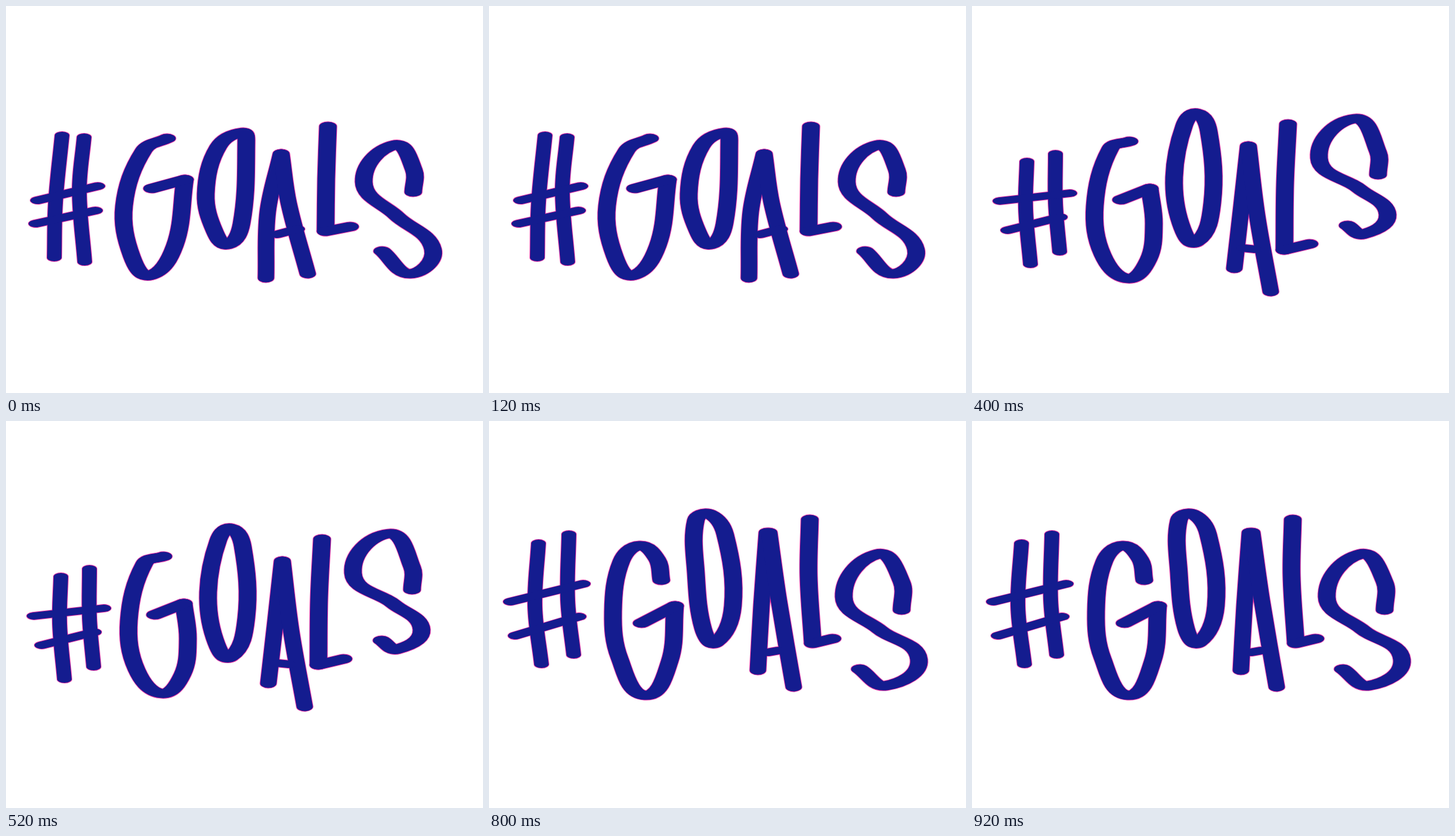
Write an HTML page with a canvas that moves like this. It is 800 px wide and 649 px high and loops after 1 s.

```html
<!DOCTYPE html>
<html lang="en">
<head>
<meta charset="utf-8">
<title>#GOALS</title>
<style>
html, body { margin: 0; width: 100%; height: 100%; overflow: hidden; background: #fff; }
canvas { display: block; width: 100vw; height: 100vh; }
</style>
</head>
<body>
<canvas id="stage" width="800" height="649" role="img" aria-label="#GOALS"></canvas>
<script>
const INK = '#141c8f', EDGE = '#e62fa2', HOLD = 200;
const ctx = document.getElementById('stage').getContext('2d');
let grow = 0;

// Sweeps a flat oval nib along a smooth curve through the points.
function sweep(w, h, xy, closed) {
  const n = xy.length / 2, last = closed ? n : n - 1;
  const at = i => {
    const k = closed ? (i + n) % n : Math.max(0, Math.min(n - 1, i));
    return { x: xy[2 * k], y: xy[2 * k + 1] };
  };
  const dir = i => {
    const a = at(i - 1), b = at(i + 1), d = Math.hypot(b.x - a.x, b.y - a.y);
    return { x: (b.x - a.x) / d, y: (b.y - a.y) / d };
  };
  ctx.beginPath();
  ctx.moveTo(xy[0], xy[1]);
  for (let i = 0; i < last; i++) {
    const p = at(i), q = at(i + 1), u = dir(i), v = dir(i + 1);
    const k = 0.36 * Math.hypot(q.x - p.x, q.y - p.y);
    ctx.bezierCurveTo(p.x + u.x * k, p.y + u.y * k, q.x - v.x * k, q.y - v.y * k, q.x, q.y);
  }
  if (closed) ctx.closePath();
  ctx.save();
  ctx.scale((w + grow) / (h + grow), 1);
  ctx.lineWidth = h + grow;
  ctx.stroke();
  ctx.restore();
}

const thin = (...xy) => sweep(24, 12, xy);
const line = (...xy) => sweep(29, 15, xy);
const leg = (...xy) => sweep(27, 15, xy);
const ring = (...xy) => sweep(29, 15, xy, true);

function sink() {
  thin(94, 217, 83, 330, 81, 422);
  thin(131, 220, 123, 310, 132, 429);
  thin(53, 326, 154, 302);
  thin(50, 365, 150, 343);
  line(270, 222, 231, 242, 198, 335, 211, 420, 241, 452, 283, 402, 300, 291);
  line(300, 291, 245, 306);
  ring(397, 212, 356, 236, 335, 315, 350, 378, 372, 400, 395, 365, 403, 230);
  leg(461, 248, 439, 345, 436, 456);
  leg(462, 248, 474, 330, 506, 449);
  thin(455, 383, 489, 374);
  line(540, 202, 537, 290, 536, 377);
  line(536, 378, 577, 370);
  line(683, 312, 684, 275, 652, 233, 600, 295, 655, 352, 716, 408, 678, 449, 631, 411);
}

function stretch() {
  thin(109, 208, 101, 320, 105, 446);
  thin(140, 202, 137, 300, 153, 421);
  thin(53, 302, 169, 272);
  thin(65, 342, 178, 310);
  line(321, 162, 288, 154, 235, 210, 218, 305, 236, 380, 271, 413, 306, 375, 313, 262);
  line(313, 262, 264, 283);
  ring(375, 225, 358, 240, 351, 325, 360, 397, 381, 432, 404, 365, 398, 250);
  leg(471, 169, 446, 280, 446, 369);
  leg(472, 169, 482, 300, 498, 403);
  thin(455, 338, 480, 338);
  line(545, 204, 539, 310, 545, 452);
  line(545, 454, 590, 433);
  line(669, 311, 672, 262, 639, 216, 592, 290, 652, 355, 701, 385, 668, 414, 640, 392);
}

function bounce() {
  thin(92, 261, 90, 340, 98, 433);
  thin(140, 248, 140, 330, 147, 412);
  thin(47, 327, 164, 314);
  thin(60, 376, 148, 354);
  line(264, 227, 232, 239, 206, 335, 219, 417, 261, 457, 296, 425, 305, 365, 298, 306);
  line(298, 306, 250, 325);
  ring(377, 180, 356, 200, 339, 287, 350, 365, 376, 396, 403, 330, 397, 210);
  leg(463, 235, 452, 335, 440, 440);
  leg(464, 235, 478, 350, 501, 479);
  thin(455, 406, 475, 408);
  line(530, 198, 525, 300, 524, 409);
  line(524, 409, 566, 399);
  line(681, 283, 681, 245, 642, 189, 582, 255, 650, 307, 697, 350, 655, 383, 630, 368);
}

function lean() {
  thin(95, 200, 92, 310, 101, 420);
  thin(142, 188, 142, 300, 155, 398);
  thin(50, 312, 165, 287);
  thin(61, 354, 182, 326);
  line(305, 190, 285, 176, 241, 213, 210, 325, 227, 408, 262, 444, 299, 403, 307, 284);
  line(307, 284, 252, 299);
  ring(376, 217, 349, 235, 343, 315, 356, 393, 380, 422, 402, 345, 395, 245);
  leg(450, 217, 445, 320, 444, 448);
  leg(453, 217, 473, 335, 510, 459);
  thin(434, 381, 490, 372);
  line(545, 189, 537, 300, 536, 399);
  line(536, 400, 576, 384);
  line(679, 304, 685, 265, 651, 198, 591, 275, 652, 340, 704, 382, 663, 408, 618, 376);
}

function rise() {
  thin(83, 205, 77, 310, 88, 408);
  thin(134, 190, 132, 300, 142, 392);
  thin(36, 303, 158, 273);
  thin(44, 360, 151, 328);
  line(289, 267, 282, 232, 253, 209, 222, 235, 208, 320, 219, 398, 262, 460, 303, 403, 312, 310);
  line(312, 310, 256, 339);
  ring(370, 156, 347, 166, 347, 255, 359, 348, 380, 372, 409, 310, 396, 190);
  leg(466, 187, 457, 310, 451, 418);
  leg(470, 187, 486, 300, 511, 446);
  thin(468, 388, 485, 385);
  line(538, 165, 536, 260, 543, 372);
  line(543, 373, 576, 365);
  line(692, 317, 692, 270, 652, 223, 595, 295, 655, 350, 721, 400, 665, 444, 622, 416);
}

const poses = [sink, stretch, bounce, lean, rise];

function draw(pose) {
  ctx.fillStyle = '#fff';
  ctx.fillRect(0, 0, 800, 649);
  ctx.lineCap = ctx.lineJoin = 'round';
  for (const [color, extra] of [[EDGE, 2], [INK, 0]]) {
    ctx.strokeStyle = color;
    grow = extra;
    pose();
  }
}

let shown = -1;
function tick() {
  const i = Math.floor(performance.now() / HOLD) % poses.length;
  if (i !== shown) draw(poses[shown = i]);
  requestAnimationFrame(tick);
}
tick();
</script>
</body>
</html>
```
